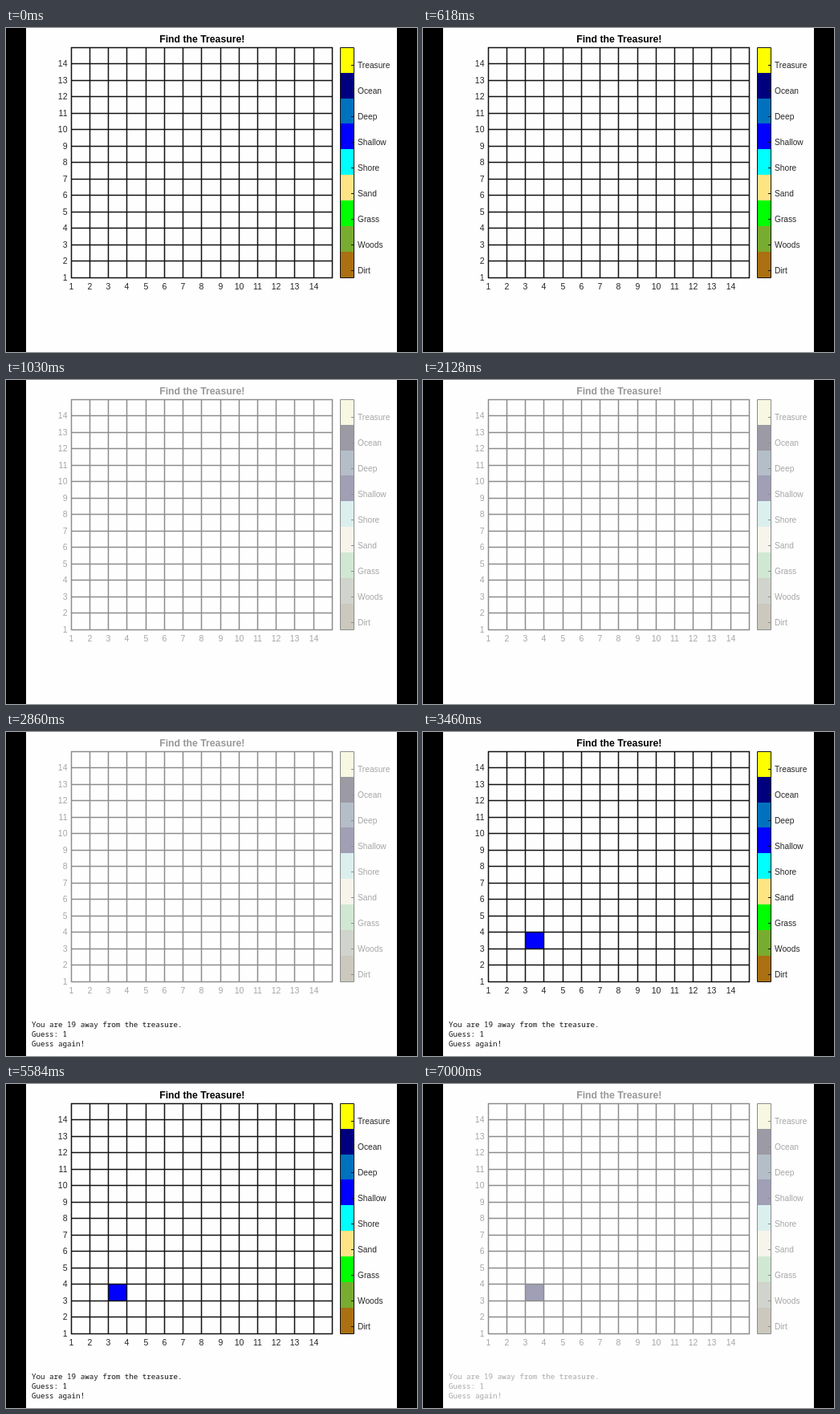
These frames come from a looping animation (512 px wide and 404 px high, 8000 ms). An HTML page:

```html
<!DOCTYPE html>
<html lang="en">
<head>
<meta charset="utf-8">
<title>Find the Treasure!</title>
<style>
html, body { margin: 0; width: 100%; height: 100%; overflow: hidden; background: #fefefe; }
svg { display: block; width: 512px; height: 404px; }
text { font: 10.5px "Liberation Sans", Arial, sans-serif; fill: #262626; white-space: pre; }
.title { font-size: 12.25px; font-weight: bold; fill: #000; }
.key { font-size: 10.2px; }
.mono { font: 9.2px "Noto Sans Mono", monospace; fill: #111; }
.mid { text-anchor: middle; }
.end { text-anchor: end; }
path { fill: none; stroke: #111; stroke-width: 1.5; }
.thin { stroke-width: 1; }
.faded text { fill: #a6a6a6; }
.faded .title { fill: #989898; }
.faded path { stroke: #8c8c8c; }
</style>
</head>
<body>
<svg viewBox="0 0 512 404">
  <rect width="512" height="404" fill="#fefefe"/>
  <path d="M12.5 0V404M499.5 0V404" style="stroke:#000;stroke-width:25"/>
  <g id="plot"></g>
  <g id="log"></g>
</svg>
<script>
const plot = document.getElementById('plot');
const log = document.getElementById('log');
const LOOP = 8000;
const LEFT = 81, RIGHT = 406, TOP = 24, BOTTOM = 311, CELLS = 14;

// name, bright colour, faded colour
const terrain = [
  ['Treasure', '#ffff00', '#f8f8e2'],
  ['Ocean', '#00007f', '#9c9aa4'],
  ['Deep', '#0072bd', '#b4bec8'],
  ['Shallow', '#0000ff', '#a09fb6'],
  ['Shore', '#00ffff', '#daefee'],
  ['Sand', '#ffe484', '#f7f4ec'],
  ['Grass', '#00ff00', '#d0e8d2'],
  ['Woods', '#77ac30', '#d0d4cc'],
  ['Dirt', '#aa7011', '#ccc8be']
];
const tiles = [];

function add(parent, tag, attrs, text = '') {
  const el = document.createElementNS('http://www.w3.org/2000/svg', tag);
  for (const name in attrs) el.setAttribute(name, attrs[name]);
  el.textContent = text;
  return parent.appendChild(el);
}
function label(parent, x, y, text, cls) {
  add(parent, 'text', { x, y, class: cls }, text);
}
function tile(x, y, width, height, kind) {
  const el = add(plot, 'rect', { x, y, width, height });
  tiles.push([el, terrain[kind]]);
  return el;
}
// Snap to whole pixels, leaning left and up
const snap = v => Math.round(v - .2);
const gridX = n => snap(LEFT + (n - 1) * (RIGHT - LEFT) / CELLS);
const gridY = n => snap(BOTTOM - (n - 1) * (BOTTOM - TOP) / CELLS);

const guess = tile(gridX(3), gridY(4), gridX(4) - gridX(3), gridY(3) - gridY(4), 3);

let lines = '';
for (let n = 1; n <= CELLS + 1; n++) {
  const x = gridX(n), y = gridY(n);
  lines += `M${x + .5} ${TOP}V${BOTTOM + 1}M${LEFT} ${y + .5}H${RIGHT + 1}`;
  if (n > CELLS) break;
  label(plot, x + .5, 326, n, 'mid');
  label(plot, 76.5, y + 4, n, 'end');
}
add(plot, 'path', { d: lines });
label(plot, 244.3, 18, 'Find the Treasure!', 'title mid');

const step = (BOTTOM - TOP) / terrain.length;
let ticks = `M416.5 ${TOP + .5}H433.5V${BOTTOM + .5}H416.5Z`;
terrain.forEach(([name], i) => {
  const y = snap(TOP + i * step);
  tile(416, y, 17, snap(TOP + (i + 1) * step) - y, i);
  const mid = Math.round(46.4 + i * step);
  ticks += `M430 ${mid + .5}H433`;
  label(plot, 438, mid + 4, name, 'key');
});
add(plot, 'path', { d: ticks, class: 'thin' });

['You are 19 away from the treasure.', 'Guess: 1', 'Guess again!'].forEach((line, i) =>
  label(log, 32, 368 + 12 * i, line, 'mono'));

function draw() {
  const t = performance.now() % LOOP;
  const faded = t >= 1030 && t < 3460 || t >= 7000;
  plot.setAttribute('class', faded ? 'faded' : '');
  log.setAttribute('class', t >= 7000 ? 'faded' : '');
  log.setAttribute('visibility', t >= 2860 ? 'visible' : 'hidden');
  guess.setAttribute('visibility', t >= 3460 ? 'visible' : 'hidden');
  for (const [el, kind] of tiles) el.setAttribute('fill', kind[faded ? 2 : 1]);
  requestAnimationFrame(draw);
}
draw();
</script>
</body>
</html>
```
